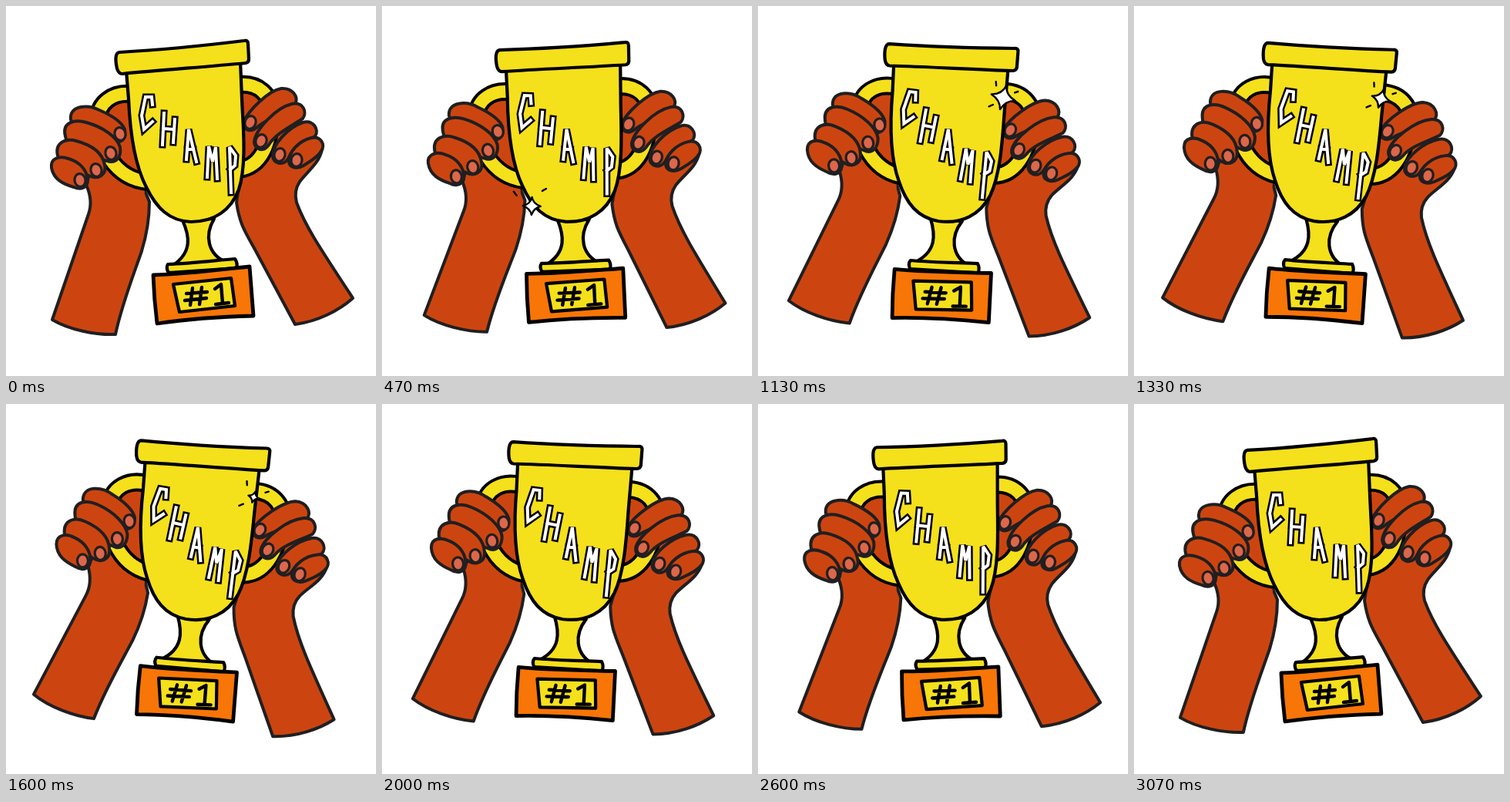
These frames come from a looping animation (480 by 480 pixels, 3140 ms). An HTML page:

```html
<!DOCTYPE html>
<html lang="en">
<head>
<meta charset="utf-8">
<title>Champ</title>
<style>
  html, body { margin: 0; width: 100%; height: 100%; overflow: hidden; background: #fff; }
  svg { display: block; width: 100vw; height: 100vh; }
  path { stroke-linecap: round; stroke-linejoin: round; }
  .skin { fill: #cc4510; stroke: #201f21; stroke-width: 4; }
  .palm { fill: #cc4510; }
  .nail { fill: #dc674b; stroke: #201f21; stroke-width: 3.2; }
  .gold { fill: #f5e01c; stroke: #000; stroke-width: 4.2; }
  .block { fill: #f87507; stroke: #000; stroke-width: 4.8; }
  .ring { fill: none; stroke: #000; stroke-width: 24; }
  .ring + .ring { stroke: #f5e01c; stroke-width: 16; }
  .ink { fill: none; stroke: #000; stroke-width: 4.4; }
  .letters path { fill: none; stroke-linejoin: miter; stroke-linecap: square; stroke-miterlimit: 2.5; }
  .spark path { fill: #fff; stroke: #000; stroke-width: 2.4; }
</style>
</head>
<body>
<svg viewBox="0 0 480 480" role="img" aria-label="Hands raising a CHAMP #1 trophy">
  <g id="scene">
    <!-- left arm and handle -->
    <path class="skin" d="M104 232C109 243 112 256 107 270L60 407C82 420 116 427 142 426C150 388 165 350 176 318Q186 285 186 254L170 215L110 212Z"/>
    <path class="palm" d="M128 122H170L180 245L128 218Z"/>
    <path class="ring" d="M162 114C138 112 120 126 120 146C118 180 140 224 184 228"/>
    <path class="ring" d="M162 114C138 112 120 126 120 146C118 180 140 224 184 228"/>
    <path class="skin" d="M84 147C82 129 106 127 121 135C135 141 150 150 154 160C156 171 151 177 143 176L90 165Z"/>
    <path class="skin" d="M77 169C72 150 90 147 104 151C126 157 144 170 148 183C150 196 143 203 135 202L82 188Z"/>
    <path class="skin" d="M67 194C63 177 78 171 91 175C110 180 125 190 128 206C131 219 120 225 110 221L74 206Z"/>
    <path class="skin" d="M59 210C57 197 70 194 81 198C95 202 105 212 106 226C106 236 97 239 88 235C74 231 62 225 59 210Z"/>

    <!-- right arm and handle -->
    <path class="skin" d="M410 186C406 205 391 214 381 228Q373 240 377 255C388 285 406 312 450 379C432 395 405 409 375 413L323 316C309 291 303 282 299 255L306 210L345 185Z"/>
    <path class="palm" d="M302 112H345L400 165L383 210L372 235L306 250Z"/>
    <path class="ring" d="M303 102C328 100 344 116 343 136C345 180 330 208 303 212"/>
    <path class="ring" d="M303 102C328 100 344 116 343 136C345 180 330 208 303 212"/>
    <path class="skin" d="M308 151C314 136 340 110 357 107C372 106 380 118 375 127C368 138 340 145 326 157C317 165 308 161 308 151Z"/>
    <path class="skin" d="M322 176C324 160 350 132 371 127C386 124 391 138 385 146C372 155 350 165 341 180C334 190 322 187 322 176Z"/>
    <path class="skin" d="M346 194C346 180 365 158 385 151C398 147 407 160 401 169C390 176 372 184 366 198C360 208 346 205 346 194Z"/>
    <path class="skin" d="M367 201C367 189 380 175 396 171C408 168 415 180 409 188C404 197 392 203 386 207C378 212 367 210 367 201Z"/>
    <g id="nails"></g>

    <!-- trophy -->
    <path class="gold" d="M229 278C238 298 242 319 217 336L285 332C262 322 257 298 270 276Z"/>
    <path class="gold" d="M156 84L159 120C161 168 168 208 182 235C195 262 212 279 240 280C270 280 292 265 302 238C313 205 307 150 306 120L304 72Z"/>
    <path class="gold" d="M147 60C200 57 260 51 309 45Q314 44 314 49L315 69Q315 73 311 74C260 79 200 83 151 88Q146 88 144 81C142 72 141 61 147 60Z"/>
    <path class="gold" d="M210 335C240 334 272 330 297 328Q301 334 299 340L211 346Q207 340 210 335Z"/>
    <path class="block" d="M191 349C230 348 278 342 316 338L321 402C280 403 236 406 196 412Q192 380 191 349Z"/>
    <path class="gold" d="M217 361L292 353L297 389L225 397Z"/>
    <path class="ink" d="M242 366L239 388M254 365L251 387M234 373L261 371M232 382L260 379M271 367L279 361L281 386M272 387L289 385"/>
    <g class="letters" id="letters"></g>
    <g class="spark" id="sparks"></g>
  </g>
</svg>
<script>
const LOOP = 3140, FRAMES = 47, SWING = 8.9, PIVOT = "243 237";
const byId = id => document.getElementById(id);

function add(parent, tag, attrs) {
  const node = document.createElementNS("http://www.w3.org/2000/svg", tag);
  for (const key in attrs) node.setAttribute(key, attrs[key]);
  return parent.appendChild(node);
}

// x, y, tilt
[[148, 166, -15], [136, 191, -15], [117, 213, -15], [96, 226, -10],
 [317, 151, 20], [331, 175, 20], [355, 193, 15], [377, 200, 10]].forEach(([x, y, tilt]) =>
  add(byId("nails"), "ellipse", {
    class: "nail", rx: 7, ry: 8.5, transform: `translate(${x} ${y}) rotate(${tilt})`
  }));

const letters = {
  C: "M190 128L189 118L181 118L176 142L179 160L190 150",
  H: "M205 139L203 180M219 147L217 177M204 159L218 160",
  A: "M234 199L237 160L247 202M235 186L243 186",
  M: "M261 222L263 182L268 202L272 183L274 224",
  P: "M292 242L290 183L298 194L297 207L291 212"
};
Object.values(letters).forEach(d => {
  add(byId("letters"), "path", { d, stroke: "#000", "stroke-width": 9 });
  add(byId("letters"), "path", { d, stroke: "#fff", "stroke-width": 4 });
});

const STAR = "M0 -16Q2 -4 16 0Q4 3 0 16Q-3 4 -16 0Q-3 -3 0 -16Z";
const sparks = [
  { x: 195, y: 261, first: 5, last: 13, peak: 9, tilt: 0, dashes: "M-24 -18L-20 -13M13 -20L18 -23" },
  { x: 302.5, y: 110, first: 13, last: 25, peak: 17, tilt: 8, dashes: "M-12 -19L-11 -14M-17 14L-12 11M14 -8L18 -10" }
].map(spark => {
  const group = add(byId("sparks"), "g", { transform: `translate(${spark.x} ${spark.y})` });
  add(group, "path", { d: spark.dashes });
  const star = add(group, "path", { d: STAR, "vector-effect": "non-scaling-stroke" });
  return { ...spark, group, star };
});

function drawSpark({ first, last, peak, tilt, group, star }, frame) {
  const visible = frame >= first && frame <= last;
  group.setAttribute("visibility", visible ? "visible" : "hidden");
  if (!visible) return;
  const away = frame < peak ? (peak - frame) / (peak - first + 1) : (frame - peak) / (last - peak + 1);
  star.setAttribute("transform", `rotate(${tilt}) scale(${1 - 0.7 * away})`);
}

function render(now) {
  const time = Math.floor((now % LOOP) / 10) * 10 + 5;
  const frame = Math.min(FRAMES - 1, Math.floor(time * 0.015));
  const angle = SWING * (1 - Math.cos(2 * Math.PI * frame / FRAMES)) / 2;
  byId("scene").setAttribute("transform", `rotate(${angle} ${PIVOT})`);
  sparks.forEach(spark => drawSpark(spark, frame));
}

const start = performance.now();
function tick() {
  render(performance.now() - start);
  requestAnimationFrame(tick);
}
tick();
</script>
</body>
</html>
```
